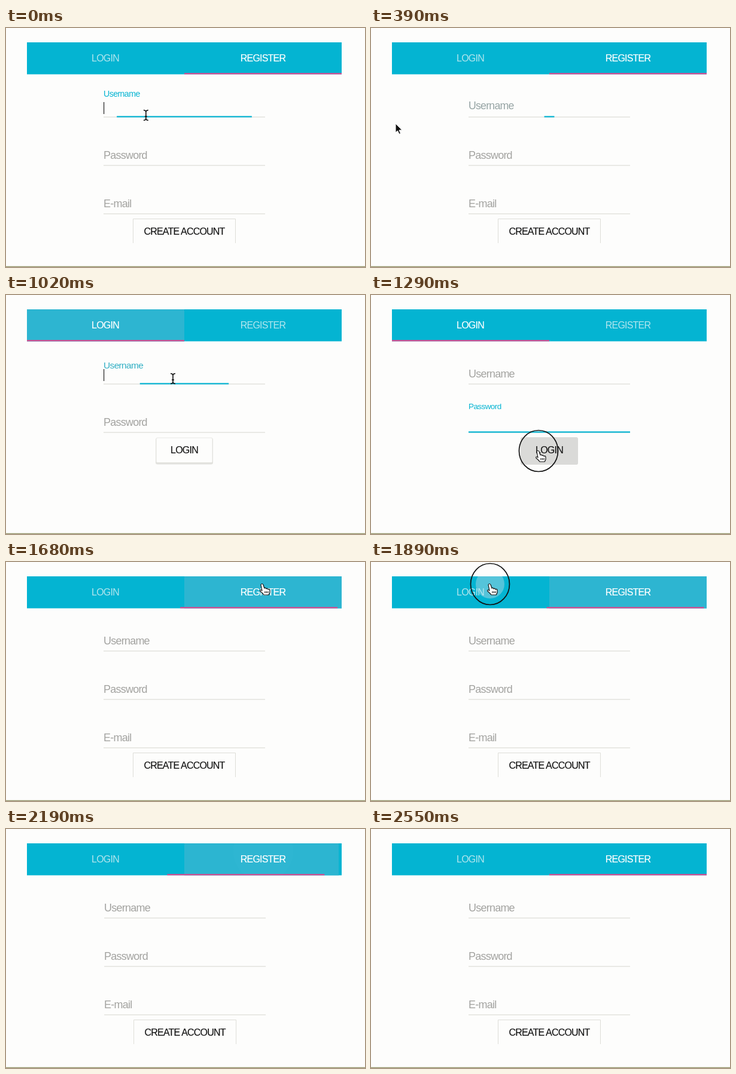
Recreate the animation shown at these times as an HTML page. Size 600 by 400 pixels, loop 2580 ms.

```html
<!DOCTYPE html>
<html lang="en">
<head>
<meta charset="utf-8">
<title>Login and register tabs</title>
<style>
html, body { margin: 0; width: 100%; height: 100%; overflow: hidden; background: #fdfdfc; }
svg { display: block; width: 100vw; height: 100vh; }
text { font-family: "Liberation Sans", Arial, sans-serif; letter-spacing: -.043em; }
.caps { font-size: 16px; letter-spacing: -.05em; text-anchor: middle; stroke-width: .2px; }
.dark { fill: #151515; stroke: #151515; }
</style>
</head>
<body>
<svg viewBox="0 0 600 400">
  <defs>
    <clipPath id="bodyClip"><rect x="35" y="77" width="526" height="283"/></clipPath>
    <clipPath id="barClip"><rect x="35" y="24" width="526" height="53.500"/></clipPath>
  </defs>
  <rect width="600" height="400" fill="#fdfdfc"/>
  <rect y="398.700" width="600" height="1.300" fill="#94946a"/>

  <g clip-path="url(#barClip)">
    <rect x="35" y="24" width="526" height="54" fill="#04b4d2"/>
    <rect id="loginGlow" x="35" y="24" height="54" fill="#2db5d1"/>
    <rect id="registerGlow" x="298" y="24" height="54" fill="#2db5d1"/>
    <circle id="ripple" fill="#55c4da"/>
  </g>
  <text id="loginTab" class="caps" x="166" y="56">LOGIN</text>
  <text id="registerTab" class="caps" x="429.500" y="56">REGISTER</text>
  <rect id="ink" y="75.400" width="263" height="2" fill="#ea4088"/>

  <g clip-path="url(#bodyClip)">
    <g id="login">
      <rect x="250" y="239.500" width="96" height="44" rx="3" fill="#e2e2de"/>
      <rect x="251" y="239" width="94" height="41.500" rx="2" fill="#fdfdfc" stroke="#e2e2de" stroke-width=".8"/>
      <rect id="press" x="250" y="238" width="96" height="46" rx="3" fill="#dadad8"/>
      <text class="caps dark" x="298" y="265">LOGIN</text>
    </g>
    <g id="register">
      <path d="M212.500 362V319.500H383.500V362" fill="none" stroke="#dedeD8"/>
      <text class="caps dark" x="298" y="346">CREATE ACCOUNT</text>
    </g>
  </g>

  <ellipse id="ring" rx="32.500" ry="34.500" fill="none" stroke="#111" stroke-width="1.700"/>
  <path id="beam" fill="none" stroke="#111" stroke-width="1.600"
    d="M-4-8.500Q0-8.500 0-5Q0-8.500 4-8.500M0-6V6M-4 8.500Q0 8.500 0 5Q0 8.500 4 8.500M-2 2H2"/>
  <path id="hand" fill="#fff" stroke="#111" stroke-width="1.200" stroke-linejoin="round"
    d="M-3 1Q-1-2 1 1L3 7Q5 5 6 8Q8 6 9 9Q12 7 12 11V14Q11 17 10 18H2Q0 15-4 12Q-5 9-2 10L-1 11ZM4 12V15M6.500 12V15M9 12V15"/>
  <path id="arrow" fill="#111" stroke="#fff" d="M0 0V15L3.500 12L6 17.500L8.500 16.500L6 11H11Z"/>
</svg>
<script>
const LOOP = 2580, STEP = 30, HOLD = 100, LAG = 40;
const CYAN = [4, 180, 210], GREY = [163, 163, 160];
const $ = id => document.getElementById(id);
const ease = p => p < .5 ? 4 * p ** 3 : 1 - 4 * (1 - p) ** 3;
const ramp = (t, a, span) => Math.max(0, Math.min(1, (t - a) / span));
const mix = (a, b, p) => a + (b - a) * p;
const set = (el, attrs) => { for (const k in attrs) el.setAttribute(k, attrs[k]); };
const show = (id, on) => set($(id), { visibility: on ? "visible" : "hidden" });

// Everything follows from these presses: when, where and on what.
const presses = [
  [-116, 234, 146, "register Username"],
  [275, 41, 160, "page"],
  [750, 222, 72, "login tab"],
  [920, 279, 140, "login Username"],
  [1095, 279, 215, "login Password"],
  [1250, 280, 261, "login button"],
  [1560, 430, 37, "register tab"],
  [1850, 199, 37, "login tab"],
  [2084, 430, 37, "register tab"],
  [2185, 430, -50, "away"]
].map(([at, x, y, on], i, all) => ({ at, x, y, on, next: i + 1 < all.length ? all[i + 1][0] : LOOP }));
const tabPresses = presses.filter(p => p.on.endsWith("tab"));
const latest = (t, list) => list.filter(p => p.at <= t).pop();

function add(parent, tag, attrs) {
  const el = document.createElementNS("http://www.w3.org/2000/svg", tag);
  set(el, attrs);
  return parent.appendChild(el);
}

// A text field: floating label, base line, focus line and caret.
function field(view, name, base) {
  const g = $(view);
  const press = presses.find(p => p.on === `${view} ${name}`);
  const label = add(g, "text", { x: 163 });
  label.textContent = name;
  add(g, "rect", { x: 163, y: base + 10.5, width: 270, height: 1, fill: "#d6d6d0" });
  const line = add(g, "rect", { y: base + 9.3, height: 2.2, fill: "#04b4d2" });
  const caret = add(g, "rect", { x: 163, y: base - 14, width: 1.2, height: 20, fill: "#222" });
  return t => {
    const since = press ? t - press.at - LAG : -1;
    const left = press ? t - press.next - LAG : -1;
    const p = ease(ramp(since, 0, 116)) * (1 - ease(ramp(left, 0, 100)));
    const tint = GREY.map((c, i) => Math.round(mix(c, CYAN[i], Math.min(1, p * 1.3))));
    set(label, { y: base - 28 * p, "font-size": mix(18, 13.5, p), fill: `rgb(${tint})` });
    set(line, { x: 298 - 135 * p, width: 270 * p });
    set(caret, { opacity: since > 30 && since < 125 ? 1 : 0 });
  };
}

const fields = ["Username", "Password", "E-mail"].map((name, i) => field("register", name, 138 + 81 * i))
  .concat(["Username", "Password"].map((name, i) => field("login", name, 138 + 81 * i)));

// 1 is the register side, 0 the login side.
const slide = (t, delay, span) => tabPresses.reduce((v, p) =>
  mix(v, p.on === "register tab" ? 1 : 0, ease(ramp(t, p.at + delay, span))), 1);

function drawPointer(t, inLogin) {
  const i = presses.indexOf(latest(t, presses));
  const from = presses[i], to = presses[i + 1] || from;
  const start = from.at + HOLD;
  const p = ease(ramp(t, start, Math.max(1, to.at - start)));
  const x = mix(from.x, to.x, p), y = mix(from.y, to.y, p);
  const hand = (x > 35 && x < 561 && y > 24 && y < 78) ||
    (inLogin && Math.abs(x - 298) < 48 && Math.abs(y - 261) < 23);
  const beam = Math.abs(x - 298) < 135 && [138, 219].some(b => Math.abs(y - b + 4) < 16);
  const kind = hand ? "hand" : beam ? "beam" : "arrow";
  for (const id of ["hand", "beam", "arrow"]) show(id, id === kind);
  set($(kind), { transform: `translate(${x} ${y})` });
  set($("ring"), { cx: x, cy: y });
  show("ring", t - from.at < 75);
}

function drawTab(view, t, share) {
  const press = latest(t, tabPresses.filter(p => p.on === view + " tab"));
  const on = share > .5;
  set($(view + "Tab"), { fill: on ? "#fff" : "#b4e6ee", stroke: on ? "#fff" : "none" });
  set($(view + "Glow"), {
    width: press ? 263 * ramp(t, press.at, 108) : 0,
    opacity: press ? share * (1 - ramp(t, press.next + HOLD, 90)) : 0
  });
}

function draw(t) {
  const body = slide(t, 38, 74);
  set($("ink"), { x: 35 + 263 * slide(t, 20, 123) });
  set($("register"), { transform: `translate(${526 * (1 - body)} 0)` });
  set($("login"), { transform: `translate(${-526 * body} 0)` });
  drawTab("login", t, 1 - body);
  drawTab("register", t, body);

  const tab = latest(t, tabPresses);
  if (tab) set($("ripple"), { cx: tab.x, cy: tab.y, r: 8 + .4 * (t - tab.at) });
  set($("ripple"), { opacity: tab ? 1 - ramp(t, tab.at + LAG, 70) : 0 });
  const button = presses.find(p => p.on === "login button").at;
  set($("press"), { opacity: ramp(t, button, 35) * (1 - ramp(t, button + 80, HOLD)) });
  fields.forEach(update => update(t));
  drawPointer(t, body < .5);
}

function tick(now) {
  draw(Math.floor((now % LOOP) / STEP) * STEP);
  requestAnimationFrame(tick);
}
draw(0);
requestAnimationFrame(tick);
</script>
</body>
</html>
```
